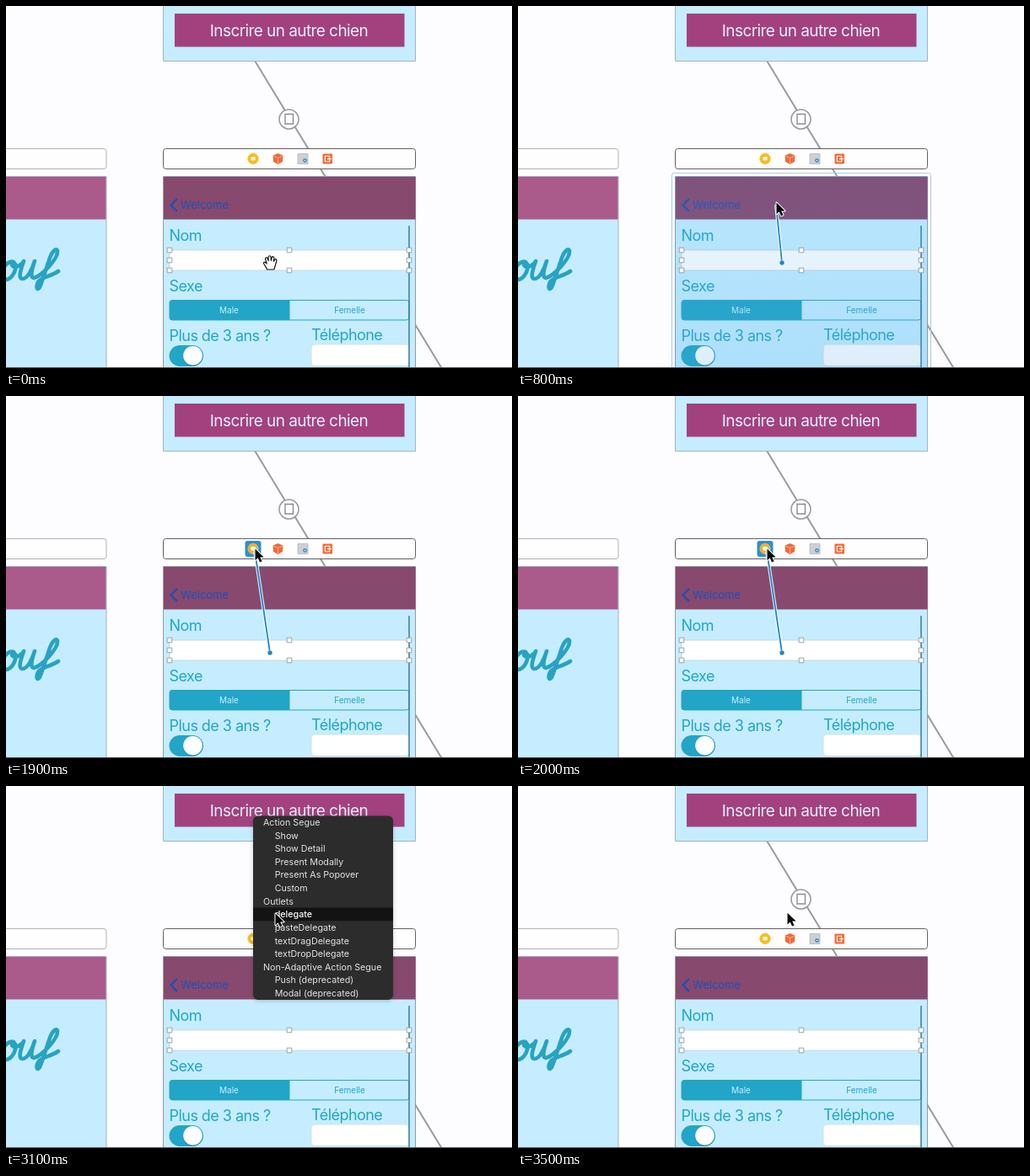
Recreate the animation shown at these times as an HTML page with a canvas. Size 600 by 430 pixels, loop 3.6 s.

```html
<!DOCTYPE html>
<html lang="fr">
<head>
<meta charset="utf-8">
<style>
html, body { margin: 0; width: 600px; height: 430px; overflow: hidden; background: #fdfcfe; }
canvas { display: block; }
</style>
</head>
<body>
<canvas id="stage" width="600" height="430"></canvas>
<script>
const ctx = document.getElementById('stage').getContext('2d');
const LOOP = 3600, STEP = 100;
const SKY = '#c5edff', TEAL = '#22a5c6', GRAY = '#9a9a9c', BLUE = '#1f86cf';
const FONT = 'Inter, "Open Sans", sans-serif';

// time, x, y of the pointer tip
const PATH = [
  [0, 313, 305], [500, 313, 304], [600, 312, 295], [800, 306, 233], [1000, 295, 187],
  [1200, 295, 181], [2000, 295, 181], [2300, 303, 182],
  [2500, 305, 174], [2800, 318, 153], [3100, 319, 151], [3600, 319, 150]
];

const MENU = [
  '#Action Segue', 'Show', 'Show Detail', 'Present Modally', 'Present As Popover', 'Custom',
  '#Outlets', 'delegate', 'pasteDelegate', 'textDragDelegate', 'textDropDelegate',
  '#Non-Adaptive Action Segue', 'Push (deprecated)', 'Modal (deprecated)'
];
const ROW = 15.62;

function pointer(t) {
  let i = 0;
  while (i < PATH.length - 2 && t >= PATH[i + 1][0]) i++;
  const [t0, x0, y0] = PATH[i], [t1, x1, y1] = PATH[i + 1];
  const k = (t - t0) / (t1 - t0);
  return [x0 + (x1 - x0) * k, y0 + (y1 - y0) * k];
}

function paint(fill, stroke, width = 1) {
  if (fill) { ctx.fillStyle = fill; ctx.fill(); }
  if (stroke) { ctx.strokeStyle = stroke; ctx.lineWidth = width; ctx.stroke(); }
}

function box(x, y, w, h, r, fill, stroke, width) {
  ctx.beginPath();
  ctx.roundRect(x, y, w, h, r);
  paint(fill, stroke, width);
}

function disc(x, y, r, fill, stroke, width) {
  ctx.beginPath();
  ctx.arc(x, y, r, 0, Math.PI * 2);
  paint(fill, stroke, width);
}

function poly(points, fill, stroke, width) {
  ctx.beginPath();
  points.forEach(([x, y], i) => i ? ctx.lineTo(x, y) : ctx.moveTo(x, y));
  if (fill) ctx.closePath();
  paint(fill, stroke, width);
}

function text(str, x, y, size, color, { align = 'left', track = 0, weight = 400 } = {}) {
  ctx.font = `${weight} ${size}px ${FONT}`;
  ctx.letterSpacing = `${track * size}px`;
  ctx.textAlign = align;
  ctx.fillStyle = color;
  ctx.fillText(str, x, y);
}

function lettering() {
  const pen = new Path2D(
    'M9 304 C2 302 -6 312 -4 321 C-2 328 6 325 10 316 C13 309 11 303 7 305 C6 312 14 311 20 305 ' +
    'M21 303 C18 312 14 323 19 324 C25 325 31 313 34 303 C31 312 28 323 33 323 ' +
    'C42 321 62 300 61 291 C60 286 54 292 51 302 C47 314 43 327 40 334 ' +
    'C37 339 35 334 38 328 C41 322 52 322 62 315');
  ctx.save();
  ctx.lineCap = ctx.lineJoin = 'round';
  ctx.strokeStyle = '#28a3c0';
  ctx.lineWidth = 4.6;
  ctx.stroke(pen);
  ctx.restore();
}

function icons(hot) {
  if (hot) box(283.5, 172, 19, 19, 3, '#2b8fd6');
  disc(293, 181.3, 6.6, hot ? '#e6b43c' : '#f8bf1c');
  box(289.8, 178.6, 6.4, 5.4, 1, '#fff6d8', '#e5a80f', 0.8);

  poly([[322.5, 175], [328.5, 177.5], [328, 185], [322.5, 188], [317, 185], [316.5, 177.5]], '#f2693a');
  poly([[317, 178], [322.5, 180.5], [328, 178]], null, '#ffc3a8', 0.8);
  poly([[322.5, 180.5], [322.5, 187]], null, '#ffc3a8', 0.8);

  box(346, 175.5, 12, 12, 0, '#cfcfd2', '#b4b4b8', 0.8);
  disc(354.5, 183.5, 2.4, '#3a93cf');
  disc(354.5, 183.5, 0.8, '#fff');

  box(375.5, 175.5, 11.5, 12, 1, '#f26a35');
  box(378.3, 178.3, 5.4, 6.4, 0, null, '#fff', 1.1);
  poly([[381, 181.5], [386, 181.5]], null, '#fff', 1.2);
}

function scene(hotIcon) {
  ctx.fillStyle = '#fdfcfe';
  ctx.fillRect(0, 0, 600, 430);

  poly([[295, 65], [516.5, 430]], null, GRAY, 2);
  disc(335.5, 134.5, 11.5, '#fdfcfe', GRAY, 1.6);
  box(331, 128.5, 9.5, 11.5, 0, null, '#8c8c8e', 1.4);

  // upper screen
  box(186.5, -5, 299, 70.5, 0, SKY, '#a3b4bd');
  box(200, 9, 272.5, 39.5, 0, '#a3417f');
  text('Inscrire un autre chien', 335.5, 36, 19, '#e0effb', { align: 'center', track: -0.03 });

  // left screen
  box(-5, 169.5, 124, 24, 3, '#fefefe', '#b3b3b5');
  box(-5, 202.5, 124, 235, 0, SKY, '#a3aeb5');
  ctx.fillStyle = '#ab5a8c';
  ctx.fillRect(0, 203, 118.5, 50.5);
  lettering();

  // form screen
  box(186.5, 169.5, 299, 24, 3, '#fefefe', '#606063');
  icons(hotIcon);
  box(186.5, 202.5, 299, 235, 0, SKY, '#8f9ba3');
  ctx.fillStyle = '#87496d';
  ctx.fillRect(187, 203, 298.5, 50.5);
  poly([[203, 229], [195.5, 236.5], [203, 244]], null, '#1c4fbe', 2.3);
  text('Welcome', 207, 241, 13, '#1c4fbe');

  const label = { track: -0.03 };
  text('Nom', 193.5, 279, 18, TEAL, label);
  text('Sexe', 193.5, 339, 18, TEAL, label);
  text('Plus de 3 ans ?', 193.5, 398, 18, TEAL, label);
  text('Téléphone', 362, 397, 18, TEAL, label);

  box(194, 290, 284, 24, 3, '#fff', '#c4d0d8', 0.8);
  box(194, 349.5, 284, 23.5, 3, null, TEAL, 1);
  box(194, 349.5, 142.5, 23.5, [3, 0, 0, 3], TEAL);
  text('Male', 264.5, 365, 10, '#c9f0fc', { align: 'center' });
  text('Femelle', 407.5, 365, 10, TEAL, { align: 'center' });

  box(193.5, 403, 40.5, 25, 12.5, TEAL);
  disc(221.5, 416.2, 11.6, 'rgba(0,60,80,.18)');
  disc(221.5, 415.3, 11.3, '#fff');
  box(362, 402, 116, 25.5, 4, '#fff', '#cbdce5', 0.8);
  poly([[478, 261], [478, 430]], null, '#2d7199', 1.4);
}

function handles() {
  for (const y of [290, 302, 314])
    for (const x of [194, 336, 478])
      if (x !== 336 || y !== 302) box(x - 2.8, y - 2.8, 5.6, 5.6, 0, '#fff', '#8d9aa2', 0.9);
}

function glow() {
  const g = ctx.createLinearGradient(0, 198, 0, 430);
  g.addColorStop(0, 'rgba(75,150,225,.12)');
  g.addColorStop(0.3, 'rgba(75,165,235,.12)');
  g.addColorStop(1, 'rgba(75,165,235,.19)');
  box(182.5, 198.5, 307, 240, 2, null, '#a5cde8', 1);
  ctx.fillStyle = g;
  ctx.fillRect(186, 202, 300, 228);
}

function wire(x, y) {
  const line = [[x, y + 3], [313, 305]];
  poly(line, null, 'rgba(255,255,255,.85)', 4);
  poly(line, null, BLUE, 1.8);
  disc(313, 305, 3.3, 'rgba(255,255,255,.8)');
  disc(313, 305, 2.7, BLUE);
}

function arrow(x, y) {
  ctx.save();
  ctx.translate(x, y);
  ctx.lineJoin = 'round';
  const shape = [[0.5, 0.5], [0.5, 14.2], [3.7, 11.3], [6, 16.4], [8.5, 15.3], [6.2, 10.4], [10.6, 10.4]];
  poly(shape, '#fff', '#fff', 2);
  poly(shape, '#080808');
  ctx.restore();
}

function hand(x, y) {
  ctx.save();
  ctx.translate(x, y);
  ctx.lineJoin = ctx.lineCap = 'round';
  const shape = new Path2D(
    'M-3.5 8 C-4 5 -7 3 -7.5 0.5 C-7.3 -1.4 -5 -0.8 -3.8 1 L-5.5 -4.5 ' +
    'C-5.5 -6.6 -3.4 -6.8 -2.8 -5 L-1.8 -2.4 L-2 -6.8 C-1.6 -8.8 .8 -8.6 1 -6.8 L1.4 -2.6 ' +
    'L2.2 -6.4 C3 -8 5 -7.2 4.8 -5.4 L4.4 -1.6 L5.8 -3.8 C7 -5 8.4 -3.8 7.8 -2 L6.4 3 L4.8 8 Z');
  ctx.fillStyle = '#fff';
  ctx.fill(shape);
  ctx.strokeStyle = '#111';
  ctx.lineWidth = 1.2;
  ctx.stroke(shape);
  ctx.restore();
}

function menu(hoverY, alpha) {
  ctx.save();
  ctx.globalAlpha = alpha;
  ctx.shadowColor = 'rgba(0,0,0,.22)';
  ctx.shadowBlur = 5;
  ctx.shadowOffsetY = 1;
  box(293, 35.5, 166, 218.5, 6, '#2d2c2d');
  ctx.shadowColor = 'transparent';
  const active = Math.round((hoverY - 43) / ROW);
  MENU.forEach((item, i) => {
    const y = 43 + i * ROW, head = item[0] === '#', on = i === active && !head;
    if (on) {
      ctx.fillStyle = '#131313';
      ctx.fillRect(293, y - ROW / 2, 166, ROW);
    }
    text(head ? item.slice(1) : item, head ? 305 : 318.7, y + 4, 10.7,
      on ? '#fff' : '#e4e3e4', { weight: on ? 500 : 400 });
  });
  ctx.restore();
}

function draw(t) {
  const [x, y] = pointer(t);
  const dragging = t >= 600 && t < 2100;
  const onIcon = dragging && t >= 1000;
  scene(onIcon);
  if (t >= 700 && t < 1000) glow();
  handles();
  if (dragging) wire(x, y);
  if (t >= 2100 && t < 3500) menu(pointer(t - 100)[1], t < 3400 ? 1 : 0.4);

  ctx.fillStyle = '#5d5d60';
  ctx.fillRect(0, 429, 600, 1);
  if (t < 500) hand(x, y); else arrow(x, y);
}

const start = performance.now();
function tick() {
  const t = (performance.now() - start) % LOOP;
  draw(Math.floor(t / STEP) * STEP);
  requestAnimationFrame(tick);
}
tick();
</script>
</body>
</html>
```
